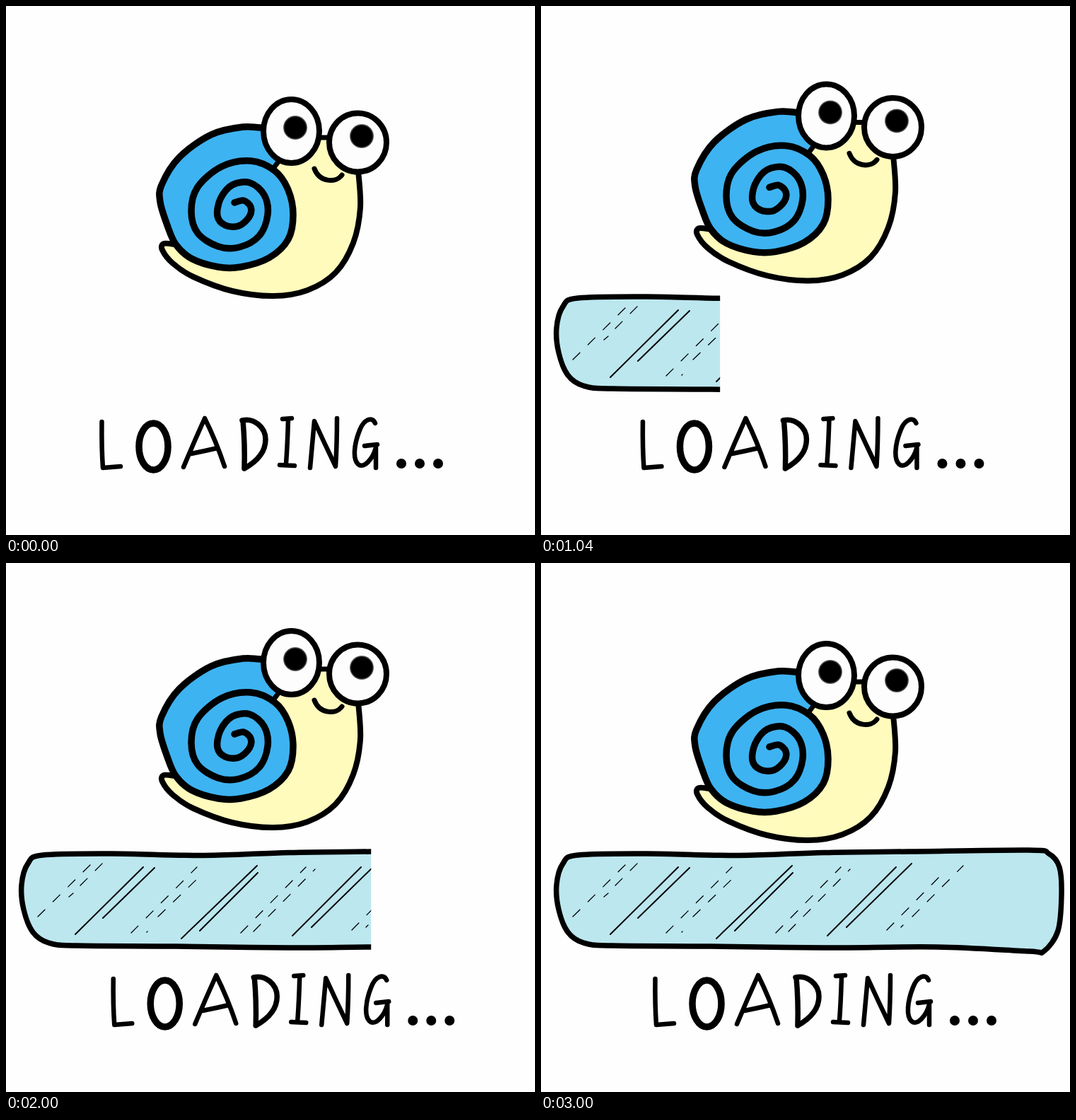
An HTML page that plays this animation: 748x748 px, repeating every 3040 ms.

```html
<!DOCTYPE html>
<html lang="en">
<head>
<meta charset="utf-8">
<title>Loading</title>
<style>
  html, body { margin: 0; width: 100%; height: 100%; overflow: hidden; background: #fefefe; }
  svg { display: block; width: 100vw; height: 100vh; }
  .ink { fill: none; stroke: #000; stroke-linecap: round; stroke-linejoin: round; }
</style>
</head>
<body>
<svg viewBox="0 0 748 748">
  <defs>
    <clipPath id="reveal"><rect id="wipe" x="0" y="380" width="0" height="190"/></clipPath>
    <radialGradient id="pupil">
      <stop offset="0.86"/>
      <stop offset="1" stop-color="#777"/>
    </radialGradient>
  </defs>

  <g clip-path="url(#reveal)">
    <path id="bar" class="ink" style="fill:#bce7ee" stroke-width="7.5"/>
    <path class="ink" stroke-width="2" d="M98 525L194 430M137 502L210 431M248 531L355 428M274 520L356 438M405 527L502 430M432 515L524 425"/>
    <path class="ink" stroke-width="1.3" stroke-dasharray="14 16" d="M45 500L119 427M89 472L95 467M105 456L137 424M177 523L270 430M199 522L200 521M215 500L270 447M332 523L424 430M350 521L437 433M489 519L562 445M509 515L512 512M525 500L597 428"/>
  </g>

  <g id="snail">
    <path id="skin" fill="#fffbbd"/>
    <path id="foot" class="ink" stroke-width="8"/>
    <path id="shell" fill="#3eb3f1"/>
    <path id="spiral" class="ink" stroke-width="9.5"/>
    <path class="ink" stroke-width="7" d="M377 231L386 219M442 186L460 186"/>
    <g class="ink" style="fill:#fdfdfd" stroke-width="8">
      <ellipse cx="403.5" cy="177" rx="39.5" ry="45"/>
      <ellipse cx="497.5" cy="193" rx="40.5" ry="41.5"/>
    </g>
    <g fill="url(#pupil)">
      <circle cx="409" cy="172" r="17"/>
      <circle cx="503" cy="184" r="17"/>
    </g>
    <path class="ink" stroke-width="7" d="M436 230C443 249 466 251 475 239"/>
  </g>

  <g id="label" class="ink" role="img" aria-label="LOADING..." stroke-width="6.5">
    <path d="M135.500 588Q135 625 137 653L162 651"/>
    <ellipse cx="208.500" cy="623" rx="20.500" ry="33" stroke-width="9.500"/>
    <path d="M251 652Q266 616 281 583Q297 615 309 651M262 633Q282 629 299 625"/>
    <path d="M335 586Q338 620 337 654M334 586C350 582 367 595 367 613C367 632 353 645 337 654" stroke-width="7.500"/>
    <path d="M391 584L404 583M399 585Q398 620 396 647M387 649L408 650"/>
    <path d="M430 653Q433 620 436 587Q451 620 466 651Q468 620 468 583"/>
    <path d="M522 590C518 580 506 584 500 600C492 620 490 641 498 648C506 655 519 640 523 624M507 622L525 620M523 624L523 653"/>
    <g fill="#000" stroke="none">
      <circle cx="559" cy="647" r="7"/>
      <circle cx="585" cy="647" r="7"/>
      <circle cx="611" cy="647" r="7"/>
    </g>
  </g>
</svg>

<script>
const LOOP = 3040, STEP = 40, SWING = 800;
const $ = id => document.getElementById(id);

// Smooth curve through "x,y x,y ..." points
function curve(text, closed) {
  const p = text.trim().split(/\s+/).map(s => s.split(',').map(Number));
  const n = p.length;
  const at = i => closed ? p[(i + n) % n] : p[Math.max(0, Math.min(n - 1, i))];
  let d = 'M' + p[0];
  for (let i = 0; i < (closed ? n : n - 1); i++) {
    const [a, b, c, e] = [at(i - 1), at(i), at(i + 1), at(i + 2)];
    const c1 = b.map((v, k) => v + (c[k] - a[k]) / 6);
    const c2 = c.map((v, k) => v - (e[k] - b[k]) / 6);
    d += `C${c1} ${c2} ${c}`;
  }
  return d + (closed ? 'Z' : '');
}

const foot = curve('498,232 501,285 491,335 466,377 426,402 378,410 320,403 265,383 236,364 221,345 223,336 238,337');
const outer = '368,173 335,171 290,182 245,214 220,253 218,277 228,310 240,337 262,357 300,369 332,369 372,356 399,330 406,295 399,260 380,233';
const inner = '346,219 305,227 271,256 262,290 271,321 300,340 330,341 358,325 370,295 365,267 345,250 320,253 303,273 299,297 310,310 329,311 344,298 346,284 336,275 323,278';

$('foot').setAttribute('d', foot);
$('skin').setAttribute('d', foot + 'L300 300L378 228L400 200L445 186L460 186Z');
$('spiral').setAttribute('d', curve(outer + ' ' + inner));
$('shell').setAttribute('d', curve(outer) + 'L386 219L395 180Z');
$('bar').setAttribute('d', curve('52,413 150,411 280,413.500 400,409.500 520,408 690,406 718,411 733,430 736,470 731,520 711,549 690,549 560,543 400,544 240,542 100,541 60,537 38,522 25,490 22,455 31,425', true));

// 0 -> 1 -> 0 at constant speed
const zigzag = t => 1 - Math.abs((t % SWING) / (SWING / 2) - 1);

function labelX(t) {
  if (t < 200) return 0;
  const low = t < 600 ? 0 : 6.5;
  return low + (26 - low) * zigzag(t - 200);
}

function draw(now) {
  const t = Math.floor((now % LOOP) / STEP) * STEP;
  $('snail').setAttribute('transform', `translate(0 ${-36 * zigzag(t)})`);
  $('label').setAttribute('transform', `translate(${labelX(t)} 0)`);
  $('wipe').setAttribute('width', Math.max(0, 0.274 * t - 31.8));
}

let start;
function tick(now) {
  start ??= now;
  draw(now - start);
  requestAnimationFrame(tick);
}
draw(0);
requestAnimationFrame(tick);
</script>
</body>
</html>
```
